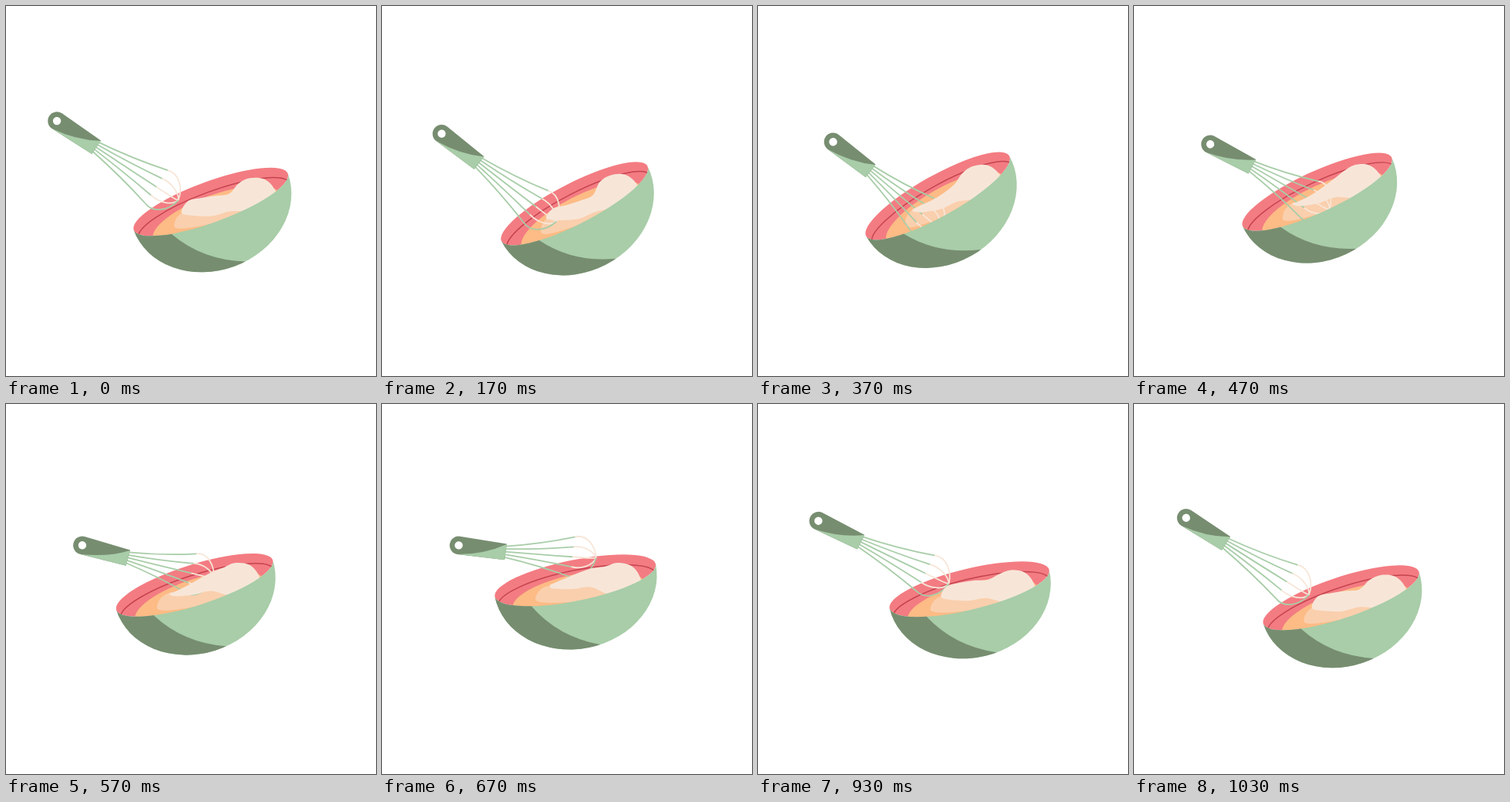
An HTML page with a canvas for the animation above (1.07 s loop, 480 by 480 pixels).

```html
<!DOCTYPE html>
<html>
<head>
<meta charset="utf-8">
<style>
html, body { margin: 0; height: 100%; overflow: hidden; background: #fff; }
canvas { display: block; width: 480px; height: 480px; }
</style>
</head>
<body>
<canvas width="480" height="480"></canvas>
<script>
const ctx = document.querySelector('canvas').getContext('2d');
const LOOP = 1070, STEPS = 32, RAD = Math.PI / 180;
const RADIUS = 106.5, RIM = 26.5, DEPTH = 89;
const PINK = '#f37c82', LINE = '#c5434f', ORANGE = '#fdbb85', PEACH = '#facfad',
  CREAM = '#f7e6d8', LIGHT = '#a8cda8', DARK = '#778d70';

// mean plus amplitudes of cos, sin, cos 2x, sin 2x, ...
const wave = (turn, mean, ...amps) => amps.reduce((sum, amp, i) =>
  sum + amp * Math[i % 2 ? 'sin' : 'cos']((1 + (i >> 1)) * turn), mean);

function fill(color, draw) {
  ctx.beginPath();
  draw();
  ctx.fillStyle = color;
  ctx.fill();
}

function stroke(color, width, draw) {
  ctx.beginPath();
  draw();
  ctx.strokeStyle = color;
  ctx.lineWidth = width;
  ctx.stroke();
}

// closed smooth curve through the points
function blob(points) {
  const n = points.length, p = i => points[(i + n) % n];
  ctx.moveTo(...p(0));
  for (let i = 0; i < n; i++) {
    const [a, b, c, d] = [p(i - 1), p(i), p(i + 1), p(i + 2)];
    ctx.bezierCurveTo(b[0] + (c[0] - a[0]) / 6, b[1] + (c[1] - a[1]) / 6,
      c[0] - (d[0] - b[0]) / 6, c[1] - (d[1] - b[1]) / 6, ...c);
  }
}

function placed(x, y, angle, draw) {
  ctx.save();
  ctx.translate(x, y);
  ctx.rotate(angle * RAD);
  draw();
  ctx.restore();
}

const ellipse = (y, rx, ry) => ctx.ellipse(0, y, rx, ry, 0, 0, 7);

function inside() {
  fill(PINK, () => ellipse(0, RADIUS, RIM));
  stroke(LINE, 1.5, () => ellipse(12, 104, 25));
  fill(ORANGE, () => ellipse(20, 87, 28));
  fill(PEACH, () => blob([[-36, 0], [-55, 12], [-46, 20], [-8, 27], [45, 32], [20, 10]]));
}

// the left half of the surface is a ripple running to the left
function batter(turn) {
  const tip = -37.5 - 4 * Math.cos(turn - 40 * RAD);
  const edge = 17 + 4.7 * Math.cos(turn - 55 * RAD);
  const ripple = [-28, -10, 8, 26].map(x =>
    [x, -5 - 6.2 * Math.cos(turn - (290 - 2 * x) * RAD)]);
  fill(CREAM, () => blob([[tip, 0], ...ripple, [42, -10], [58, -11.5], [75, -4], [83, 12],
    [80, 30], [42, 27], [18, edge], [-5, edge - 2], [-30, edge * 0.4]]));
}

function outside() {
  fill(LIGHT, () => {
    ctx.ellipse(0, 0, RADIUS, DEPTH, 0, Math.PI, 0, true);
    ctx.ellipse(0, 0, RADIUS, RIM, 0, 0, Math.PI);
  });
  ctx.clip();
  fill(DARK, () => {
    ctx.moveTo(-62, 22);
    ctx.quadraticCurveTo(-36.5, 67, 15, 88);
    ctx.lineTo(15, 110);
    ctx.lineTo(-120, 110);
    ctx.lineTo(-120, -5);
    ctx.lineTo(-62, 0);
  });
}

function whisk(length, bend) {
  ctx.save();
  ctx.transform(length, bend / 126, 0, 1, 61 * (1 - length), -bend * 61 / 126);
  for (let i = -2; i <= 2; i++) {
    const knee = 13 * i - 0.8;
    stroke(LIGHT, 1.8, () => {
      ctx.moveTo(60, 3.5 * i);
      ctx.quadraticCurveTo(110, 7 * i, 155, knee);
    });
    stroke(i < 2 ? CREAM : LIGHT, 1.8, () => {
      ctx.moveTo(155, knee);
      ctx.bezierCurveTo(170, knee * 1.2, 185, knee * 0.65, 188, -2);
    });
  }
  ctx.restore();
  fill(DARK, () => {
    ctx.arc(0, 0, 11.8, Math.PI / 2, -Math.PI / 2);
    ctx.lineTo(61.5, -10.5);
    ctx.lineTo(61.5, 10.5);
  });
  fill(LIGHT, () => {
    ctx.moveTo(0, 11.8);
    ctx.quadraticCurveTo(34, 7, 61.5, -10);
    ctx.lineTo(61.5, 10.5);
  });
  fill('#fff', () => ctx.arc(0, 0, 5.2, 0, 7));
}

function drawBowl(turn, part) {
  const x = wave(turn, 253, 13.4, -13.4, 1.1, -1, -1.8);
  const y = wave(turn, 242.8, 8.5, 11.7, 2.8, 0.3);
  placed(x, y, wave(turn, -19.8, 0, -10.3, -0.3, 1.1), part);
}

function drawWhisk(turn) {
  const x = wave(turn, 87.4, -16.4, -2.2, -4.9, -1);
  const y = wave(turn, 168.6, -16.5, 1.5, -3, 4.2);
  const push = (0.5 - 0.5 * Math.cos(turn)) ** 2;
  placed(x, y, wave(turn, 26.6, 7.2, 13.4, 0, -4.2),
    () => whisk(1 - 0.1 * push, 12 * push * Math.sin(turn)));
}

function frame(now) {
  const step = Math.min(STEPS - 1, Math.floor((now % LOOP + 4) * 0.03));
  const turn = step / STEPS * 2 * Math.PI;
  ctx.fillStyle = '#fff';
  ctx.fillRect(0, 0, 480, 480);
  drawBowl(turn, inside);
  drawWhisk(turn);
  drawBowl(turn, () => {
    batter(turn);
    outside();
  });
  requestAnimationFrame(frame);
}
frame(performance.now());
</script>
</body>
</html>
```
